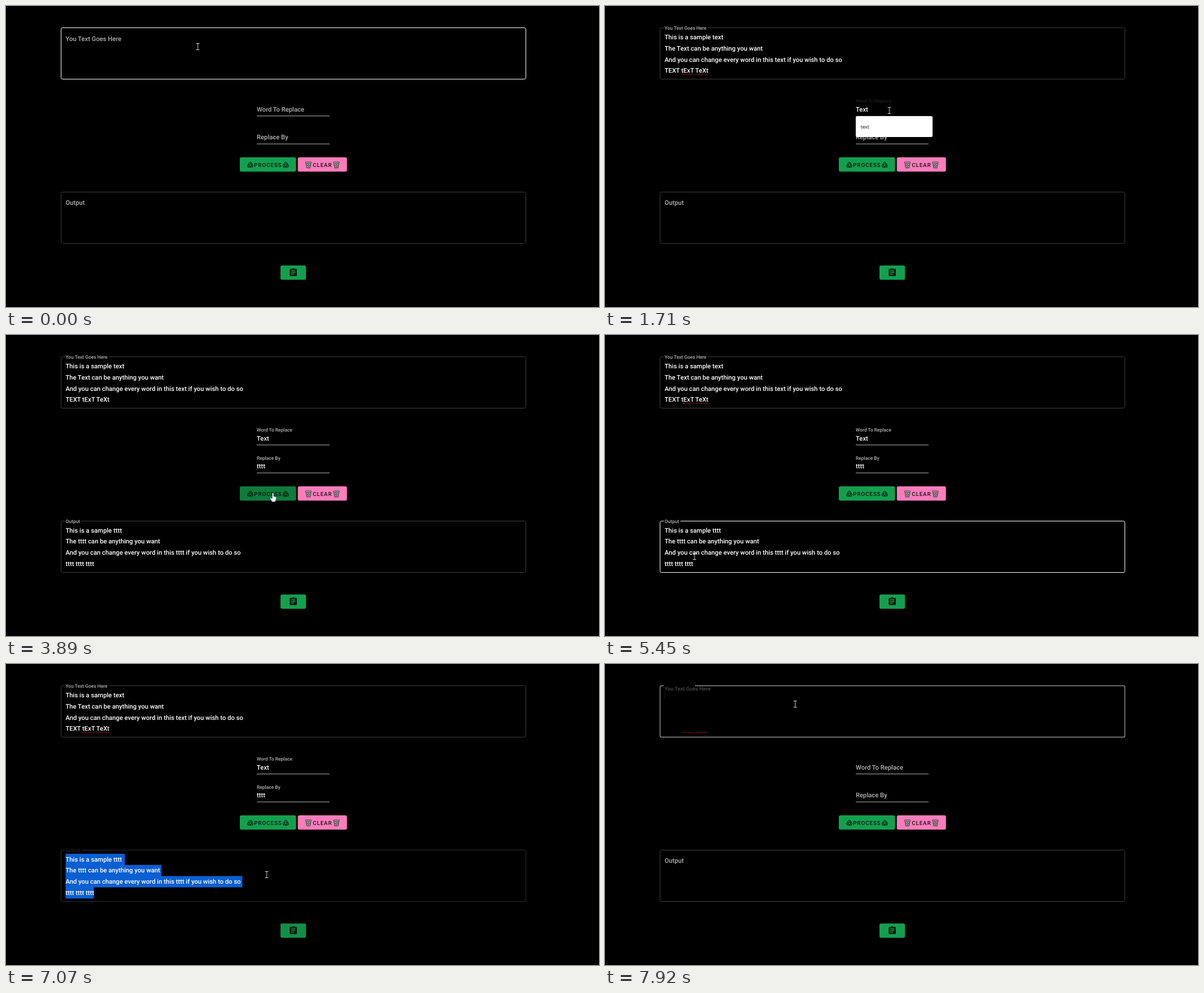
Write an HTML page that moves like this. It is 1050 by 533 pixels and loops after 8 s.

```html
<!DOCTYPE html>
<html lang="en">
<head>
<meta charset="utf-8">
<title>Word replacer</title>
<style>
/* One loop is 8 s, so 1% of every keyframe list is 80 ms. */
@property --float { syntax: "<number>"; inherits: true; initial-value: 0; }
@property --focus { syntax: "<number>"; inherits: true; initial-value: 0; }
@property --hover { syntax: "<number>"; inherits: true; initial-value: 0; }

html, body { margin: 0; width: 100%; height: 100%; overflow: hidden; background: #000; }
svg { display: block; width: 1050px; height: 533px; }
text {
  font: 500 11.25px Roboto, sans-serif;
  fill: #fff;
  white-space: pre;
  text-rendering: geometricPrecision;
}

/* Fields: label, outline and underline all follow --float, --focus and --hover */
.field { animation: 8s cubic-bezier(.25, .8, .5, 1) infinite; }
.label {
  fill: hsl(0, 0%, calc(70% - 58% * var(--focus)));
  transform: translateY(calc(var(--rise) * var(--float))) scale(calc(1 - .25 * var(--float)));
}
.area { --rise: -19.9px; }
.line { --rise: -15.5px; }
.outline {
  --fade: calc(var(--focus) * var(--focus));
  fill: none;
  stroke: hsl(0, 0%, calc((24% + 76% * var(--hover)) * (1 - var(--fade)) + 12.5% * var(--fade)));
  stroke-width: calc(1px + .6px * var(--focus));
}
.notch { transform: scaleX(var(--float)); }
.rule { fill: hsl(0, 0%, calc(70% + 30% * var(--hover))); }
.rule-focus { fill: #1e1e1e; transform: scaleX(var(--focus)); }

#input { animation-name: input; }
#word { animation-name: word; }
#by { animation-name: by; }
#output { animation-name: output; }
@keyframes input {
  0%, 1% { --float: 0; --focus: 0; --hover: 1; }
  4.75% { --float: 1; --focus: 1; }
  10% { --hover: 1; }
  10.5% { --hover: 0; }
  14% { --focus: 1; }
  17.75% { --focus: 0; }
  92.5% { --float: 1; }
  96.25% { --float: 0; }
  96.5% { --hover: 0; }
  97% { --hover: 1; }
  98% { --float: 0; --focus: 0; }
  99% { --float: .7; --focus: .7; }
  100% { --float: .92; --focus: .92; --hover: 1; }
}
@keyframes word {
  0%, 14% { --float: 0; --focus: 0; }
  12.3% { --hover: 0; }
  12.8% { --hover: 1; }
  17.75% { --float: 1; --focus: 1; }
  26.1% { --focus: 1; }
  29.9% { --focus: 0; }
  42.5% { --hover: 1; }
  43% { --hover: 0; }
  92.5% { --float: 1; }
  96.25%, 100% { --float: 0; --focus: 0; --hover: 0; }
}
@keyframes by {
  0%, 26.1% { --float: 0; --focus: 0; }
  29.9% { --float: 1; --focus: 1; }
  45% { --focus: 1; }
  48.5% { --focus: 0; }
  92.5% { --float: 1; }
  96.25%, 100% { --float: 0; --focus: 0; }
}
@keyframes output {
  0%, 46% { --float: 0; }
  49.75% { --float: 1; }
  59% { --hover: 0; }
  59.5%, 76% { --hover: 1; }
  76.5% { --hover: 0; }
  82.5% { --focus: 0; }
  86.25%, 92% { --focus: 1; }
  92.5% { --float: 1; }
  95% { --focus: 0; }
  96.25%, 100% { --float: 0; --focus: 0; --hover: 0; }
}

/* Hard switches */
.cut { animation: 8s step-end infinite; }
#pasted { animation-name: pasted; }
#spelling { animation-name: spelling; }
#result { animation-name: result; }
#selection { animation-name: selection; }
#caret { animation-name: caret; }
#typed-word { animation-name: type-word; }
#typed-by { animation-name: type-by; }
@keyframes pasted { 0%, 92.5%, 100% { opacity: 0; } 6% { opacity: 1; } }
@keyframes spelling { 0%, 43%, 100% { opacity: 0; } 6%, 55.5% { opacity: 1; } }
@keyframes result { 0%, 92.5%, 100% { opacity: 0; } 46% { opacity: 1; } }
@keyframes selection { 0%, 92%, 100% { opacity: 0; } 82.5% { opacity: 1; } }
@keyframes caret { 0%, 14% { opacity: 0; } 1%, 98%, 100% { opacity: 1; } }
@keyframes type-word {
  0%, 92.5%, 100% { clip-path: inset(0 100% 0 0); }
  17.375% { clip-path: inset(0 70% 0 0); }
  19.5% { clip-path: inset(0 17% 0 0); }
  21.375% { clip-path: inset(0); }
}
@keyframes type-by {
  0%, 92.5%, 100% { clip-path: inset(0 100% 0 0); }
  28.5% { clip-path: inset(0 75% 0 0); }
  29.5% { clip-path: inset(0 50% 0 0); }
  30.7% { clip-path: inset(0 25% 0 0); }
  32.125% { clip-path: inset(0); }
}

/* Buttons */
.button text { font-size: 9.84px; letter-spacing: .88px; fill: #101510; }
.shade { opacity: 0; animation: 8s linear infinite; }
#shade-process { animation-name: shade-process; }
#shade-clear { animation-name: shade-clear; }
#shade-copy { animation-name: shade-copy; }
@keyframes shade-process {
  0%, 43.8%, 57.5%, 100% { opacity: 0; }
  44.5%, 45%, 51.5%, 56% { opacity: .08; }
  46.2%, 49% { opacity: .22; }
}
@keyframes shade-clear {
  0%, 90.4%, 95.2%, 100% { opacity: 0; }
  91%, 92% { opacity: .08; }
  92.8%, 93.8% { opacity: .2; }
}
@keyframes shade-copy {
  0%, 79.2%, 95%, 100% { opacity: 0; }
  80%, 82% { opacity: .08; }
  83%, 85% { opacity: .22; }
  87%, 92% { opacity: .1; }
}

/* Suggestion popups */
.popup { transform-box: fill-box; transform-origin: center; animation: 8s linear infinite; }
.popup text { font: 500 8.4px "Noto Sans", sans-serif; fill: #111; }
#hint-word { animation-name: hint-word; }
#hint-by { animation-name: hint-by; }
@keyframes hint-word {
  0%, 17.37%, 29%, 100% { opacity: 0; transform: scale(.97); }
  17.375%, 26.1% { opacity: 1; transform: none; }
}
@keyframes hint-by {
  0%, 28.49%, 38.9%, 100% { opacity: 0; transform: scale(.97); }
  28.5%, 35.9% { opacity: 1; transform: none; }
  37% { opacity: .68; transform: scale(.985); }
}

/* Pointer */
#pointer { animation: move 8s ease-in-out infinite; }
@keyframes move {
  0%, 7% { transform: translate(339.5px, 72px); }
  13%, 41.8% { transform: translate(503.5px, 185px); }
  45%, 55.4% { transform: translate(472.5px, 280px); }
  64.5%, 69% { transform: translate(158.5px, 392px); }
  72%, 73.8% { transform: translate(185px, 402px); }
  80.5%, 84.4% { transform: translate(508px, 472.5px); }
  88.375% { transform: translate(461.5px, 373px); }
  91.5%, 93.6% { transform: translate(560px, 281px); }
  97.6%, 100% { transform: translate(336.8px, 71px); }
}
#beam { animation-name: beam; }
#hand { animation-name: hand; }
#arrow { animation-name: arrow; }
@keyframes beam {
  0%, 12.3%, 59%, 86.5%, 96.5%, 100% { opacity: 1; }
  10.2%, 42.6%, 76%, 89.5% { opacity: 0; }
}
@keyframes hand {
  0%, 56.5%, 85.2%, 94.2%, 100% { opacity: 0; }
  44.2%, 79.6%, 90.5% { opacity: 1; }
}
@keyframes arrow {
  0%, 12.3%, 44.2%, 59%, 79.6%, 86.5%, 90.5%, 96.5%, 100% { opacity: 0; }
  10.2%, 42.6%, 56.5%, 76%, 85.2%, 89.5%, 94.2% { opacity: 1; }
}
</style>
</head>
<body>
<svg viewBox="0 0 1050 533">
  <defs>
    <path id="blade" d="M-3.2-2L-1.4-5H1.5L3.2-2.2 1.4-1.2 0-3.3-1.4-.9Z" fill="#13a04e" stroke="#06180c" stroke-width="1"/>
    <g id="recycle">
      <use href="#blade"/>
      <use href="#blade" transform="rotate(120)"/>
      <use href="#blade" transform="rotate(240)"/>
    </g>
    <g id="bin" stroke="#2b2b2b" stroke-width=".8">
      <path d="M-4.6-4.2L-3.1 5.4H3.1L4.6-4.2Z" fill="#a09a9d"/>
      <path d="M-3.8-1L2 5M-3-3.6L3.5 2.6M3.8-1L-2 5M3-3.6L-3.5 2.6" stroke-width=".6"/>
      <rect x="-5.4" y="-5.6" width="10.8" height="2" rx="1" fill="#c9c4c6"/>
    </g>
    <rect id="frame" x="97.5" y="38.5" width="823" height="91" rx="2.8"/>
    <rect id="base" x="0" y="7.7" width="129" height="1"/>
  </defs>

  <g id="input" class="field area">
    <use href="#frame" class="outline"/>
    <g transform="translate(104 36)"><rect class="notch" width="78" height="6"/></g>
    <g transform="translate(105.5 61.6)"><text class="label">You Text Goes Here</text></g>
    <rect id="caret" class="cut" x="105.7" y="48" width="1" height="14" fill="#1c1c1c"/>
    <g id="pasted" class="cut">
      <text x="105.5" y="59">This is a sample text</text>
      <text x="105.5" y="78.8">The Text can be anything you want</text>
      <text x="105.5" y="98.5">And you can change every word in this text if you wish to do so</text>
      <text x="105.5" y="118.3">TEXT tExT TeXt</text>
    </g>
    <path id="spelling" class="cut" d="M135 120.9H157M160 120.9H183" stroke="#a01818" stroke-width=".9"/>
  </g>

  <g id="word" class="field line" transform="translate(444 186.5)">
    <use href="#base" class="rule"/>
    <g transform="translate(64.5 7.5)"><rect class="rule-focus" x="-64.5" width="129" height="1.5"/></g>
    <text class="label">Word To Replace</text>
    <text id="typed-word" class="cut">Text</text>
  </g>

  <g id="by" class="field line" transform="translate(444 236)">
    <use href="#base" class="rule"/>
    <g transform="translate(64.5 7.5)"><rect class="rule-focus" x="-64.5" width="129" height="1.5"/></g>
    <text class="label">Replace By</text>
    <text id="typed-by" class="cut">tttt</text>
  </g>

  <g class="button">
    <rect x="414" y="268" width="99.5" height="25.3" rx="2.8" fill="#13a04e"/>
    <use href="#recycle" x="432.6" y="281.8"/>
    <text x="439.3" y="284.7">PROCESS</text>
    <use href="#recycle" x="495.4" y="281.8"/>
    <rect id="shade-process" class="shade" x="414" y="268" width="99.5" height="25.3" rx="2.8"/>
  </g>
  <g class="button">
    <rect x="516.7" y="268" width="87" height="25.3" rx="2.8" fill="#ff7cbc"/>
    <use href="#bin" x="535.5" y="281.5"/>
    <text x="543.2" y="284.7">CLEAR</text>
    <use href="#bin" x="585" y="281.5"/>
    <rect id="shade-clear" class="shade" x="516.7" y="268" width="87" height="25.3" rx="2.8"/>
  </g>
  <g class="button">
    <rect x="486" y="459.5" width="45.2" height="25.3" rx="2.8" fill="#13a04e"/>
    <g transform="translate(502.3 464)">
      <path d="M1.4 1.6H4.4A2.1 2.1 0 0 1 8.3 1.6H11.3Q12.7 1.6 12.7 3V12.9Q12.7 14.3 11.3 14.3H1.4Q0 14.3 0 12.9V3Q0 1.6 1.4 1.6Z" fill="#0a1a10"/>
      <path d="M2.8 5H9.9M2.8 7.8H9.9M2.8 10.6H7.8" stroke="#13a04e" stroke-width="1.4"/>
      <circle cx="6.35" cy="2.1" r=".7" fill="#13a04e"/>
    </g>
    <rect id="shade-copy" class="shade" x="486" y="459.5" width="45.2" height="25.3" rx="2.8"/>
  </g>

  <g id="output" class="field area">
    <use href="#frame" y="291" class="outline"/>
    <g transform="translate(104 327)"><rect class="notch" width="29.5" height="6"/></g>
    <g transform="translate(105.5 352.4)"><text class="label">Output</text></g>
    <path id="selection" class="cut" d="M105.5 336H210.5V355.8H275V375.6H418.5V395.4H155.5V415.2H105.5Z" fill="#0a5fd2"/>
    <g id="result" class="cut">
      <text x="105.5" y="349.5">This is a sample tttt</text>
      <text x="105.5" y="369.3">The tttt can be anything you want</text>
      <text x="105.5" y="389.1">And you can change every word in this tttt if you wish to do so</text>
      <text x="105.5" y="408.9">tttt tttt tttt</text>
    </g>
  </g>

  <g id="hint-word" class="popup">
    <rect x="444" y="195" width="136" height="37" rx="2.5" fill="#fff"/>
    <text x="452.7" y="216.8">text</text>
  </g>
  <g id="hint-by" class="popup">
    <rect x="444" y="244.6" width="136" height="37" rx="2.5" fill="#fff"/>
    <text x="452.7" y="266.4">tttt</text>
  </g>

  <g id="pointer">
    <path id="beam" class="cut" d="M-3-5.5H3M-3 5.5H3M0-5.5V5.5" stroke="#d8d8d8"/>
    <path id="hand" class="cut" d="M-1.3 .9A1.3 1.3 0 0 1 1.3 .9V5.6L4.8 6.4Q6.4 6.8 6.3 8.4L5.6 12Q5 15.4 3 15.4H-.5Q-1.6 15.4-2.4 13.8L-5 9.6Q-5 8-3.4 8.2L-1.3 9.6Z" fill="#fff" stroke="#111" stroke-width=".6"/>
    <path id="arrow" class="cut" d="M0 0V11.4L2.7 8.9 4.4 12.8 6 12.1 4.3 8.3H8Z" fill="#fff" stroke="#111" stroke-width=".6"/>
  </g>
</svg>
</body>
</html>
```
